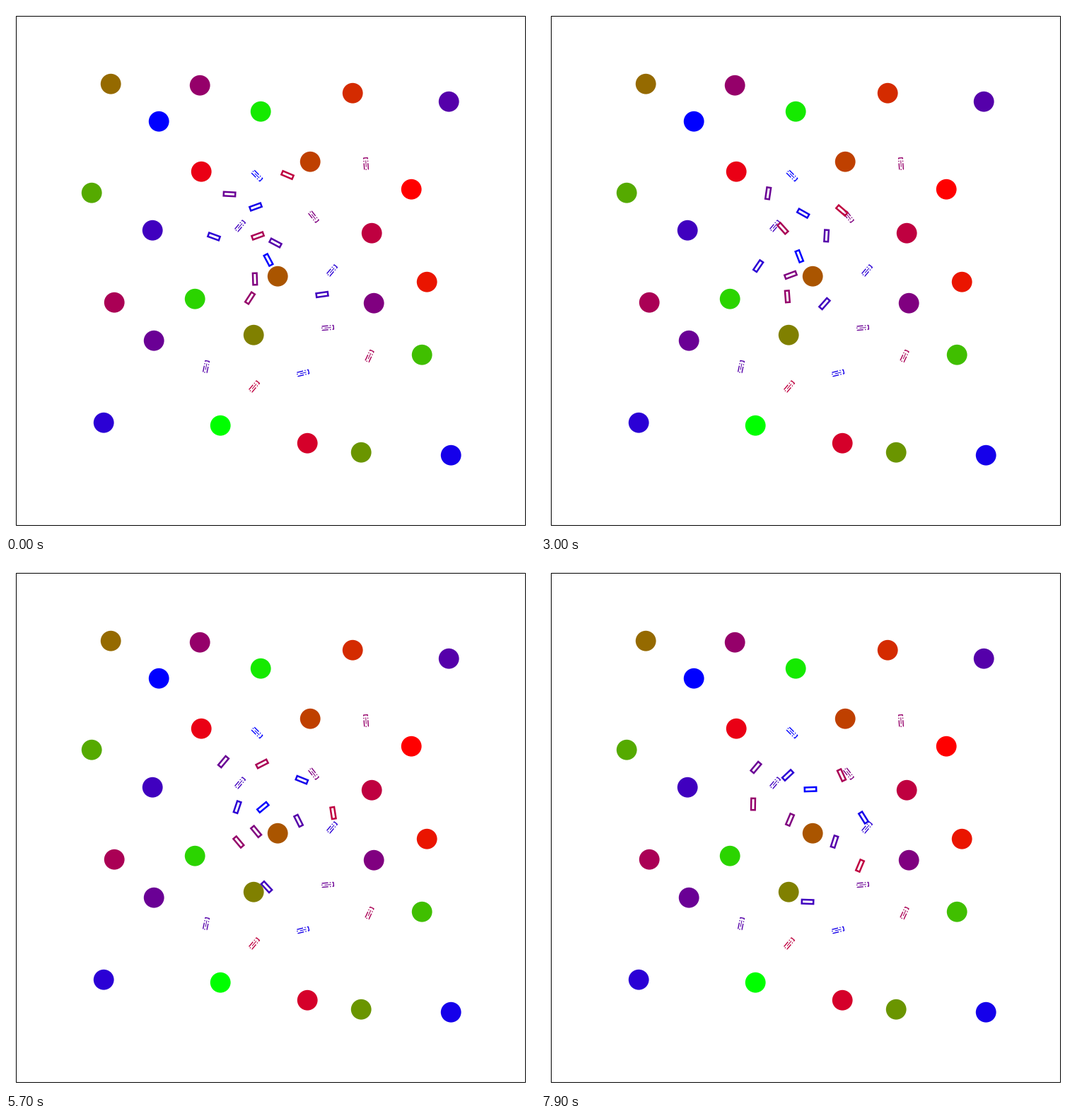
Recreate the animation shown at these times as a matplotlib script. Size 748 by 748 pixels, loop 8000 ms.

```python
import numpy as np
import matplotlib.pyplot as plt
from matplotlib.animation import FuncAnimation
from matplotlib.patches import Circle, Polygon, Rectangle

SIZE, DPI = 748, 64
FRAMES, STEP = 80, 100
PT = 72 / DPI                      # points per pixel
LENGTH, WIDTH = 16.4, 5.6
KNOTS = np.array([1, 23, 48, 79], float)


def shade(i):
    """Colour i of 25 along blue, red, green."""
    t = i / 12
    return (t, 0, 1 - t) if t <= 1 else (2 - t, t - 1, 0)


def axis_of(deg):
    """Unit vectors for counter-clockwise angles, with y pointing down."""
    a = np.radians(deg)
    return np.stack([np.cos(a), -np.sin(a)], axis=-1)


def box(mid, deg):
    """Corners of a body centred on mid and turned by deg."""
    along = axis_of(deg) * LENGTH / 2
    side = axis_of(deg - 90) * WIDTH / 2
    return np.array([-along - side, along - side,
                     along + side, side - along]) + mid


fig = plt.figure(figsize=(SIZE / DPI, SIZE / DPI), dpi=DPI, facecolor="white")
ax = fig.add_axes([0, 0, 1, 1])
ax.set_xlim(0, SIZE)
ax.set_ylim(SIZE, 0)
ax.axis("off")
ax.add_patch(Rectangle((14.5, 14.5), 720, 720, fill=False, ec="black",
                       lw=PT, snap=False))

discs = [(216, 163), (629, 635), (138, 589), (207, 317), (626, 135),
         (209, 473), (520, 420), (274, 112), (153, 419), (517, 321),
         (426, 618), (276, 234), (573, 259), (595, 390), (490, 123),
         (430, 220), (384, 382), (148, 110), (350, 465), (502, 631),
         (121, 264), (588, 493), (267, 414), (360, 149), (303, 593)]
for i, (x, y) in enumerate(discs):
    ax.add_patch(Circle((x + 0.2, y + 0.2), 14.4, fc=shade(i), lw=0, zorder=2))

goals = [(355, 240, -45), (420, 519, 14), (461, 374, 50), (331, 311, 50),
         (283, 510, 78), (455, 455, 5), (435, 298, -52), (509, 223, 94),
         (514, 495, 65), (351, 538, 50)]
for i, (x, y, deg) in enumerate(goals):
    ax.add_patch(Polygon(box((x, y), deg), fill=False, ec=shade(i),
                         lw=1.4 * PT, ls="-.", zorder=3))
    reach = axis_of(deg) * LENGTH / 4
    ax.plot(*np.transpose([(x, y) - reach, (x, y) + reach]),
            color=shade(i), lw=PT, zorder=3)


class Robot:
    """Drives forwards or backwards along its own axis between poses."""

    def __init__(self, i, *poses):
        poses = np.array(poses, float)
        self.pos, self.degs = poses[:, :2], poses[:, 2]
        axis = axis_of(self.degs)
        vel = np.gradient(self.pos, KNOTS, axis=0)
        self.vel = axis * np.sum(vel * axis, axis=1, keepdims=True)
        self.patch = ax.add_patch(Polygon(box((0, 0), 0), fill=False, zorder=4,
                                          ec=shade(i), lw=2.5 * PT))

    def place(self, n):
        n = max(n, KNOTS[0])
        k = min(np.searchsorted(KNOTS, n, side="right"), len(KNOTS) - 1) - 1
        h = KNOTS[k + 1] - KNOTS[k]
        u = (n - KNOTS[k]) / h
        s = u * u * (3 - 2 * u)
        mid = ((1 - s) * self.pos[k] + s * self.pos[k + 1]
               + h * u * (1 - u) * ((1 - u) * self.vel[k] - u * self.vel[k + 1]))
        self.patch.set_xy(box(mid, np.interp(n, KNOTS, self.degs)))


# x, y and heading at each knot
robots = [
    Robot(0, (371, 359, -62), (368, 354, -47), (359, 354, -125), (381, 320, -178)),
    Robot(1, (353, 284, 20), (363, 290, -38), (402, 297, -7), (456, 360, -58)),
    Robot(2, (294, 326, -20), (304, 367, -135), (324, 360, -97), (349, 300, -137)),
    Robot(3, (447, 408, 8), (409, 408, 64), (372, 452, 8), (377, 479, -182)),
    Robot(4, (381, 335, -28), (404, 319, 68), (408, 355, 135), (415, 394, 72)),
    Robot(5, (316, 266, -3), (323, 262, -86), (310, 277, -130), (304, 289, -130)),
    Robot(6, (352, 386, 92), (352, 380, 38), (355, 383, -25), (352, 363, -113)),
    Robot(7, (345, 413, 57), (348, 411, 74), (342, 407, 147), (300, 341, 89)),
    Robot(8, (356, 325, 20), (344, 320, -22), (345, 288, -115), (425, 300, -245)),
    Robot(9, (398, 239, -23), (412, 280, -30), (457, 327, -68), (451, 428, -113)),
]


def draw(n):
    for robot in robots:
        robot.place(n)
    return [robot.patch for robot in robots]


anim = FuncAnimation(fig, draw, frames=FRAMES, init_func=lambda: draw(0),
                     interval=STEP, repeat=True, repeat_delay=0, blit=False)
plt.show()
```
